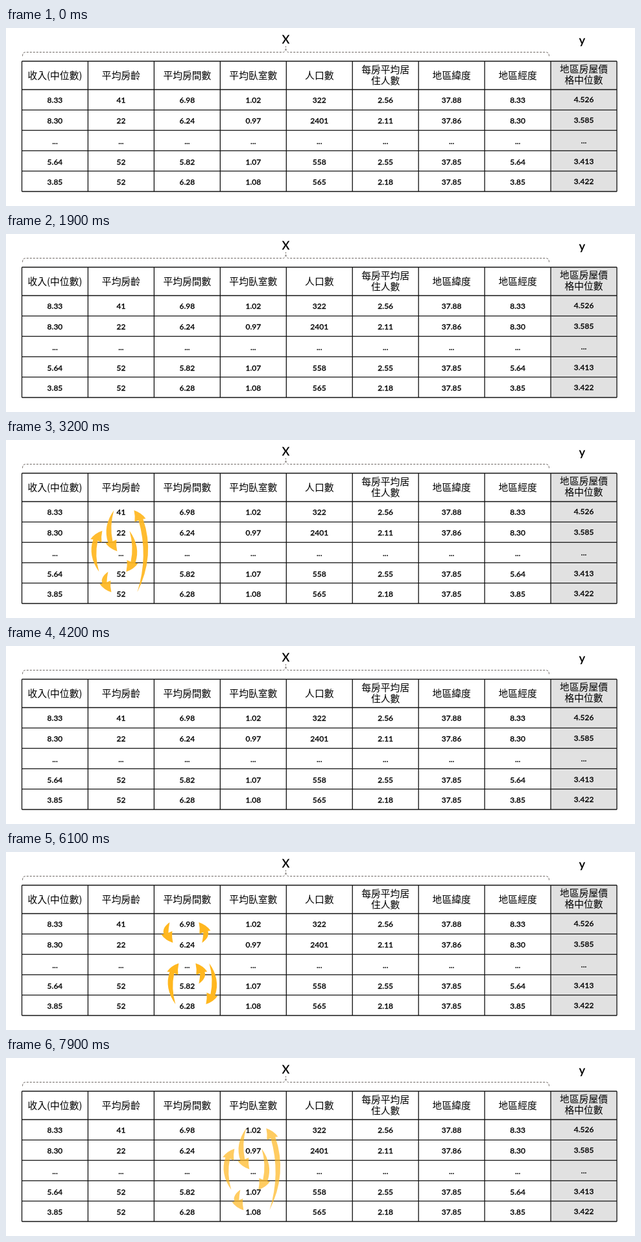
Recreate the animation shown at these times as an HTML page with a canvas. Size 970 px wide and 276 px high, loop 8 s.

```html
<!DOCTYPE html>
<html lang="zh-Hant">
<head>
<meta charset="utf-8">
<style>
html, body { margin: 0; width: 100%; height: 100%; overflow: hidden; background: #fff; }
canvas { display: block; }
</style>
</head>
<body>
<canvas id="stage" width="970" height="276"></canvas>
<script>
const ctx = document.getElementById('stage').getContext('2d');
const LOOP = 8000, STEP = 100, FADE = 500;
const CJK = '14.8px "Noto Sans CJK TC", "Noto Sans CJK", sans-serif';
const LATIN = 'Lato, sans-serif';

const TOP = 51.5, BOTTOM = 253.5;
const colX = i => 24.5 + 101.95 * i;
const rowLine = r => 95.5 + 31.6 * r;
const rowMid = r => 112 + 31.75 * r;
const centerX = i => (colX(i) + colX(i + 1)) / 2;

const columns = [
  '收入(中位數) 8.33 8.30 ... 5.64 3.85',
  '平均房齡 41 22 ... 52 52',
  '平均房間數 6.98 6.24 ... 5.82 6.28',
  '平均臥室數 1.02 0.97 ... 1.07 1.08',
  '人口數 322 2401 ... 558 565',
  '每房平均居/住人數 2.56 2.11 ... 2.55 2.18',
  '地區緯度 37.88 37.86 ... 37.85 37.85',
  '地區經度 8.33 8.30 ... 5.64 3.85',
  '地區房屋價/格中位數 4.526 3.585 ... 3.413 3.422',
].map(line => line.split(' '));

// A move is [from row, to row, reach]; a negative reach bends left of the column centre.
const wideMix = [[0, 2, -24], [4, 0, 38], [3, 1, -47], [1, 3, 26], [3, 4, -33]];
const shuffles = [
  { start: 900, end: 1900, lead: 110,
    moves: [[0, 2, -28], [1, 0, 33], [2, 1, 31], [3, 4, -35], [4, 3, 37]] },
  { start: 2800, end: 4200, lead: 60, moves: wideMix },
  { start: 5200, end: 6600, lead: 150,
    moves: [[0, 1, -40], [1, 0, 36], [4, 2, -31], [3, 2, 31], [2, 4, 47]] },
  { start: 7700, end: LOOP, lead: 150, moves: wideMix },
];

function latin(text, x, y, size) {
  ctx.font = `500 ${size}px ${LATIN}`;
  ctx.lineWidth = 0.3;
  ctx.fillText(text, x, y);
  ctx.strokeText(text, x, y);
}

function drawBrace() {
  const y = 37.5, left = 25.5, mid = 431.5, right = 837.5;
  ctx.strokeStyle = '#6b6460';
  ctx.lineWidth = 1;
  ctx.setLineDash([3, 2]);
  ctx.beginPath();
  ctx.moveTo(left, y + 6);
  ctx.quadraticCurveTo(left, y, left + 5, y);
  ctx.lineTo(mid - 4, y);
  ctx.quadraticCurveTo(mid, y, mid, y - 9);
  ctx.quadraticCurveTo(mid, y, mid + 4, y);
  ctx.lineTo(right - 5, y);
  ctx.quadraticCurveTo(right, y, right, y + 6);
  ctx.stroke();
  ctx.setLineDash([]);
}

function drawGrid() {
  ctx.fillStyle = '#e1e1e1';
  ctx.fillRect(colX(8), TOP, colX(9) - colX(8), BOTTOM - TOP);
  ctx.strokeStyle = '#111';
  ctx.lineWidth = 1.3;
  ctx.beginPath();
  for (let i = 0; i <= 9; i++) { ctx.moveTo(colX(i), TOP); ctx.lineTo(colX(i), BOTTOM); }
  for (let r = 0; r <= 5; r++) { ctx.moveTo(colX(0), rowLine(r)); ctx.lineTo(colX(9), rowLine(r)); }
  ctx.moveTo(colX(0), TOP);
  ctx.lineTo(colX(9), TOP);
  ctx.stroke();
}

function drawText() {
  ctx.fillStyle = ctx.strokeStyle = '#000';
  ctx.textAlign = 'center';
  columns.forEach(([title, ...values], i) => {
    const lift = i === 8 ? 1 : 0;
    const lines = title.split('/');
    ctx.font = CJK;
    lines.forEach((line, k) =>
      ctx.fillText(line, centerX(i), 78.5 - lift + (k - (lines.length - 1) / 2) * 17));
    values.forEach((v, r) => latin(v, centerX(i), rowMid(r) + 4.3 - lift, 12));
  });
  latin('X', 431.5, 24, 17.5);
  latin('y', 888.5, 25, 18);
}

// Crescent body with a tapered tail and a wide head whose tip points back to the column.
function drawArrow(center, [from, to, reach]) {
  const side = Math.sign(reach), dir = Math.sign(from - to);
  const tailY = rowMid(from) - 3, tipY = rowMid(to) - 3;
  const length = Math.abs(tailY - tipY);
  const bow = length / 6 - 6;
  const x = d => center + reach + side * d;
  const y = d => tipY + dir * d;
  const bend = y(length / 2 + 7);
  ctx.beginPath();
  ctx.moveTo(x(-18), tipY);
  ctx.quadraticCurveTo(x(-6), y(4), x(0), y(13));
  ctx.lineTo(x(-4), y(13.5));
  ctx.quadraticCurveTo(x(bow), bend, x(-13), tailY);
  ctx.quadraticCurveTo(x(bow - 10.5), bend, x(-11), y(15.5));
  ctx.lineTo(x(-17), y(18));
  ctx.quadraticCurveTo(x(-16), y(9), x(-18), tipY);
  ctx.fill();
}

function draw(t) {
  ctx.fillStyle = '#fff';
  ctx.fillRect(0, 0, 970, 276);
  drawBrace();
  drawGrid();
  drawText();

  const time = Math.floor(t / STEP) * STEP;
  ctx.fillStyle = '#ffb71f';
  shuffles.forEach(({ start, end, lead, moves }, i) => {
    if (time < start || time >= end) return;
    ctx.globalAlpha = Math.min(1, (time - start + lead) / FADE);
    moves.forEach(move => drawArrow(centerX(i), move));
  });
  ctx.globalAlpha = 1;
}

function tick() {
  draw(performance.now() % LOOP);
  requestAnimationFrame(tick);
}
tick();
</script>
</body>
</html>
```
